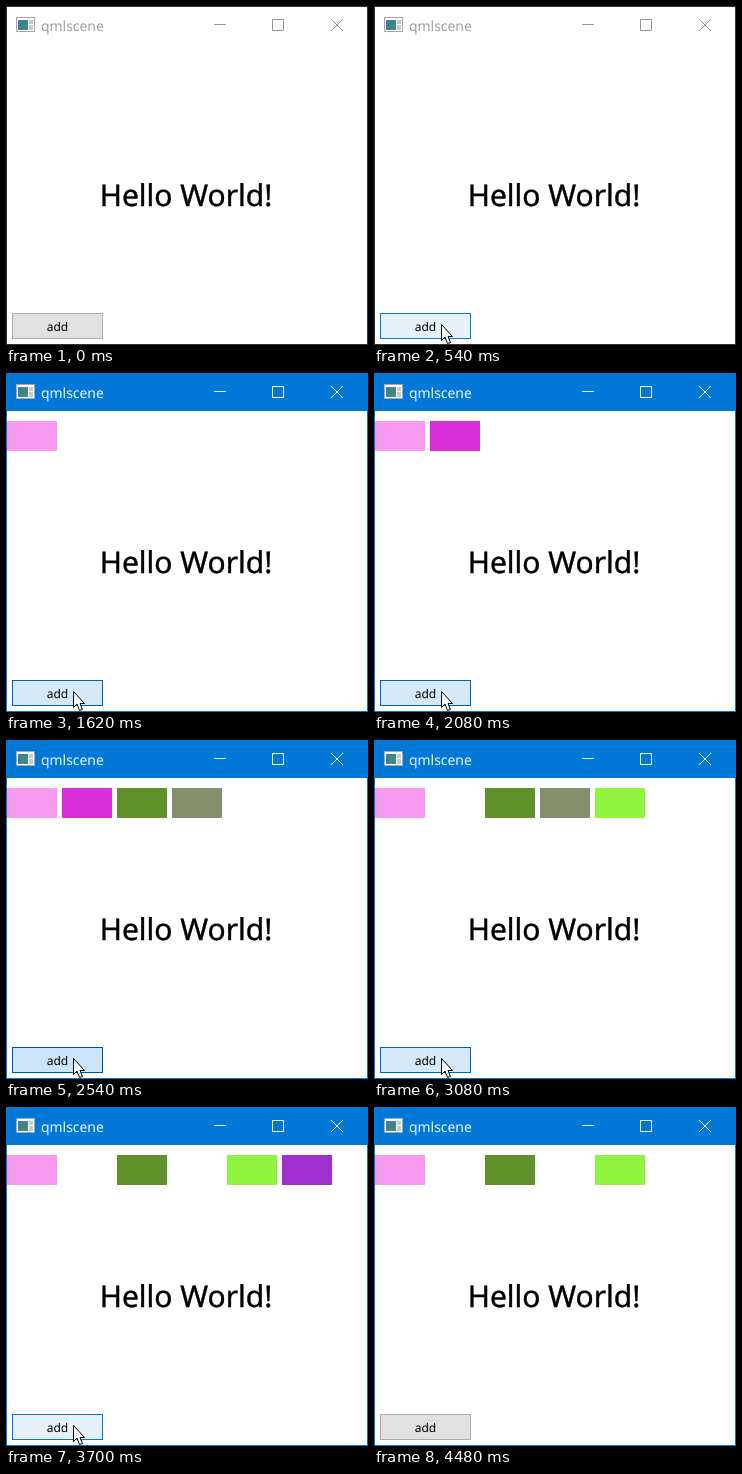
An HTML page for the animation above (4.55 s loop, 362 by 339 pixels).

```html
<!DOCTYPE html>
<html lang="en">
<head>
<meta charset="utf-8">
<title>qmlscene</title>
<style>
  html, body { margin: 0; width: 100%; height: 100%; overflow: hidden; background: #fff; }
  svg { display: block; width: 362px; height: 339px; --edge: #333; --bar: #fff; --ink: #999; }
  svg.active { --edge: #0078d7; --bar: #0078d7; --ink: #fff; }
  text { text-rendering: geometricPrecision; }
  #title { font: 14px "Open Sans", sans-serif; fill: var(--ink); }
  #hello { font: 30px "Noto Sans", sans-serif; stroke: #000; stroke-width: .4px; }
  #label { font: 12px "Noto Sans", sans-serif; }
  #bar { fill: var(--bar); }
  #controls { fill: none; stroke: var(--ink); }
  #edge { fill: none; stroke: var(--edge); }
</style>
</head>
<body>
<svg id="window" viewBox="0 0 362 339">
  <defs>
    <linearGradient id="picture" x2="1" y2="1">
      <stop offset="0" stop-color="#4576a8"/>
      <stop offset="1" stop-color="#3f8f6c"/>
    </linearGradient>
  </defs>
  <rect width="362" height="339" fill="#fff"/>
  <rect id="bar" width="362" height="38"/>

  <g shape-rendering="crispEdges">
    <rect x="10.5" y="11.5" width="18" height="14" fill="#fff" stroke="#a3a8a8"/>
    <rect x="12" y="14" width="10" height="10" fill="url(#picture)"/>
    <path d="M23 14h4v4h-4zM23 19h4v5h-4z" fill="#c3cccb"/>
  </g>
  <text id="title" x="35" y="25">qmlscene</text>
  <path id="controls" d="M208 18.5h12M266.5 13.5h11v11h-11zM325 13l12 12m0-12l-12 12"/>

  <g id="boxes" shape-rendering="crispEdges"></g>
  <text id="hello" x="180" y="200" text-anchor="middle">Hello World!</text>

  <rect id="button" x="6.5" y="307.5" width="90" height="25"/>
  <text id="label" x="51.5" y="325" text-anchor="middle">add</text>

  <rect id="edge" x=".5" y=".5" width="361" height="338" shape-rendering="crispEdges"/>
  <path id="cursor" d="M.5.5v16l3.5-3.5 2.5 6.5 3-1-2.5-6h4.5z" fill="#fff" stroke="#000"/>
</svg>
<script>
const LOOP = 4550;
const TICKS = 59; // screen updates per loop; all times below count in these
const TICK = LOOP / TICKS;
const LEAD = 9; // ms by which updates run ahead of the even rhythm
const LIFETIME = 13;

const $ = id => document.getElementById(id);
const mix = (a, b, k) => a + (b - a) * k;
const clamp = k => Math.min(1, Math.max(0, k));

function paint(node, attributes) {
  for (const name in attributes) node.setAttribute(name, attributes[name]);
}

// Each click adds a box; every second box vanishes after its lifetime
const boxes = [
  [13, "#f799ee"], [22, "#d92fd6"], [28, "#609029"],
  [33, "#858f6b"], [39, "#91f43f"], [45, "#a02fcf"]
].map(([born, fill], i) => {
  const node = document.createElementNS("http://www.w3.org/2000/svg", "rect");
  paint(node, { x: 1 + 55 * i, y: 48, width: 50, height: 30, fill });
  $("boxes").append(node);
  return { node, born, dies: i % 2 ? born + LIFETIME : Infinity };
});

function drawButton(tick) {
  const hover = clamp((tick - 2) / 4) * clamp((58 - tick) / 4);
  const sinceClick = Math.min(...boxes.map(({ born }) => Math.abs(tick - born)));
  const press = clamp(1 - 0.37 * sinceClick);
  const blend = (normal, hovered, pressed) =>
    `color-mix(in srgb, ${pressed} ${press * 100}%, ` +
    `color-mix(in srgb, ${hovered} ${hover * 100}%, ${normal}))`;
  $("button").style.fill = blend("#e1e1e1", "#e5f1fb", "#cce4f7");
  $("button").style.stroke = blend("#adadad", "#0078d7", "#005499");
}

function drawCursor(tick) {
  const arrive = 1 - (1 - clamp((tick - 1) / 4)) ** 2;
  const leave = clamp((tick - 53) / 4) ** 2;
  const x = Math.round(mix(112, 67, arrive) + 12 * leave);
  const y = Math.round(mix(333, 318, arrive) + 21 * leave);
  paint($("cursor"), {
    transform: `translate(${x} ${y})`,
    visibility: tick >= 1 && tick < 57 ? "visible" : "hidden"
  });
}

function draw(tick) {
  $("window").classList.toggle("active", tick >= 11);
  for (const { node, born, dies } of boxes)
    paint(node, { visibility: tick >= born && tick < dies ? "visible" : "hidden" });
  drawButton(tick);
  drawCursor(tick);
}

function animate() {
  const t = performance.now() % LOOP;
  draw(Math.min(TICKS - 1, Math.floor((t + LEAD) / TICK)));
  requestAnimationFrame(animate);
}
animate();
</script>
</body>
</html>
```
